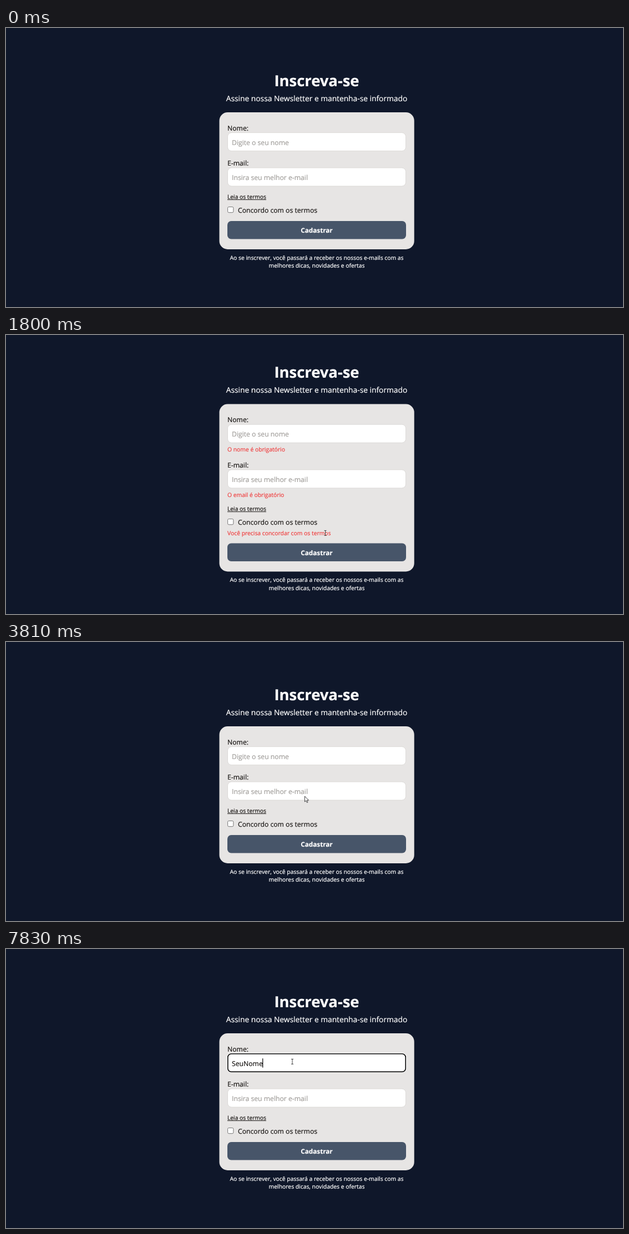
An HTML page with a canvas that plays this animation: 1112 px wide and 503 px high, repeating every 8000 ms.

```html
<!DOCTYPE html>
<html lang="pt-BR">
<head>
<meta charset="utf-8">
<title>Inscreva-se</title>
<style>
  html, body { margin: 0; width: 100%; height: 100%; overflow: hidden; background: #0f172a; }
  canvas { display: block; }
</style>
</head>
<body>
<canvas id="stage" width="1112" height="503"></canvas>
<script>
const ctx = document.getElementById('stage').getContext('2d');
const LOOP = 8000, MID = 560, LEFT = 399, WIDTH = 322, RADIUS = 7;
const ENTER = 320, ERROR_ON = 1750, RELOAD = 3240, FOCUS = 4340;
const INK = '#1c1917', RED = '#ef4444', HINT = '#a3a09d';
const BODY = 12.2, SMALL = 10.36, ERROR_ROW = 18.3;
const FIELD_H = 34, NAME_Y = 188.2, MAIL_Y = 251.6, BUTTON_Y = 348, BUTTON_H = 32.6;

const NAME = 'SeuNome';
const PRESSES = [5340, 6000, 6190, 6970, 7550, 7730, 7830];
const BLINK = 545, CLICK = 180;
const ARROW = new Path2D('M0 0V10L2.3 7.9 4 11.5 5.6 10.8 4 7.4 7.1 7.2Z');

const mix = (a, b, p) => a + (b - a) * p;
const progress = (t, from, to) => Math.min(1, Math.max(0, (t - from) / (to - from)));
const within = (v, start, size) => v >= start && v < start + size;
const hasErrors = t => t >= ERROR_ON && t < RELOAD;

function pointerAt(t) {
  if (t < RELOAD) {
    const glide = 1 - (1 - progress(t, ENTER, 960)) ** 2;
    return { x: mix(845, 575.5, glide), y: mix(479, 357, glide) };
  }
  const p = progress(t, RELOAD, 4160);
  return { x: mix(575, 516, p), y: mix(357, 203, p ** 1.4) };
}

// The pointer shape follows what lies under it with a short delay
function overText(t) {
  const past = t - 50, { y } = pointerAt(past);
  return hasErrors(past) || within(y, NAME_Y, FIELD_H) || within(y, MAIL_Y, FIELD_H);
}

function text(str, x, y, size, color, weight = 400, align = 'left') {
  ctx.font = `${weight} ${size}px "Open Sans", "Noto Sans", sans-serif`;
  ctx.textAlign = align;
  ctx.fillStyle = ctx.strokeStyle = color;
  ctx.lineWidth = 0.22;
  ctx.fillText(str, x, y);
  ctx.strokeText(str, x, y);
  return ctx.measureText(str).width;
}

const centered = (str, y, size, weight) => text(str, MID, y, size, '#fff', weight, 'center');

function box(x, y, w, h, r, fill, stroke, line = 1) {
  ctx.beginPath();
  ctx.roundRect(x, y, w, h, r);
  if (fill) {
    ctx.fillStyle = fill;
    ctx.fill();
  }
  if (stroke) {
    ctx.strokeStyle = stroke;
    ctx.lineWidth = line;
    ctx.stroke();
  }
}

// Dark focus ring with a thin white edge; grow moves it outwards
function ring(y, h, grow) {
  const line = (g, color, width) =>
    box(LEFT - g, y - g, WIDTH + 2 * g, h + 2 * g, RADIUS + g, null, color, width);
  line(grow + 0.5, '#fff', 1);
  line(grow - 0.8, '#101010', 1.7);
}

function field(y, label, hint, error, focused, value) {
  text(label, LEFT, y - 3.4, BODY, INK);
  box(LEFT + 0.5, y + 0.5, WIDTH - 1, FIELD_H - 1, RADIUS, '#fff', '#d6d3d1', 0.8);
  if (focused) ring(y, FIELD_H, 0);
  if (error) text(error, LEFT, y + 49.5, SMALL, RED);
  return text(value || hint, 407, y + 22.4, BODY, value ? INK : HINT);
}

function drawForm(t) {
  const failed = hasErrors(t), focused = t >= FOCUS;
  const done = PRESSES.filter(time => t >= time);
  const typed = NAME.slice(0, done.length);

  // Each error adds a row, and the form stays vertically centered
  const row = failed ? ERROR_ROW : 0;
  const top = -1.5 * row, second = top + row, third = second + row, last = third + row;

  centered('Inscreva-se', 104.6 + top, 27.4, 700);
  centered('Assine nossa Newsletter e mantenha-se informado', 131.8 + top, 13.78);
  box(384.5, 152 + top, 351.2, 247 + 3 * row, 15, '#e7e5e4');

  const width = field(NAME_Y + top, 'Nome:', 'Digite o seu nome',
    failed && 'O nome é obrigatório', focused, typed);
  const idle = t - (done.pop() || FOCUS);
  if (focused && idle % (2 * BLINK) < BLINK) {
    ctx.fillStyle = '#000';
    ctx.fillRect(407 + (typed ? width - 0.6 : 0), 197.3, 1.2, 16.5);
  }
  field(MAIL_Y + second, 'E-mail:', 'Insira seu melhor e-mail', failed && 'O email é obrigatório');

  const link = text('Leia os termos', LEFT, 307.8 + third, 10.26, INK);
  ctx.fillRect(LEFT, 309 + third, link, 1);
  box(399.6, 322.5 + third, 10.2, 10.2, 2, '#fff', '#767676');
  text('Concordo com os termos', 418, 332.8 + third, BODY, INK);
  if (failed) text('Você precisa concordar com os termos', LEFT, 352 + third, SMALL, RED);

  const hover = t >= ENTER && !(t >= 1800 && t < RELOAD) && within(pointerAt(t).y, BUTTON_Y, BUTTON_H);
  box(LEFT, BUTTON_Y + last, WIDTH, BUTTON_H, RADIUS, hover ? '#64748b' : '#475569');
  if (failed && t >= 3090) ring(BUTTON_Y + last, BUTTON_H, 1);
  centered('Cadastrar', 369.2 + last, 11.7, 700);

  centered('Ao se inscrever, você passará a receber os nossos e-mails com as', 417.7 + last, SMALL);
  centered('melhores dicas, novidades e ofertas', 432.3 + last, SMALL);
}

function drawPointer(t) {
  const { x, y } = pointerAt(t);
  if ([1570, FOCUS].some(start => within(t, start, CLICK))) {
    box(x - 9, y - 9, 18, 18, 9, 'rgba(255, 255, 0, 0.47)');
  }
  if (overText(t)) {
    ctx.fillStyle = '#444';
    ctx.fillRect(x - 0.5, y - 5, 1, 10);
    ctx.fillRect(x - 2, y - 5, 4, 1);
    ctx.fillRect(x - 2, y + 4, 4, 1);
    return;
  }
  ctx.save();
  ctx.translate(x, y);
  ctx.fillStyle = '#fff';
  ctx.strokeStyle = '#111';
  ctx.lineWidth = 0.8;
  ctx.fill(ARROW);
  ctx.stroke(ARROW);
  ctx.restore();
}

function draw() {
  const t = performance.now() % LOOP;
  ctx.textRendering = 'geometricPrecision';
  ctx.fillStyle = '#0f172a';
  ctx.fillRect(0, 0, 1112, 503);
  drawForm(t);
  if (t >= ENTER) drawPointer(t);
  requestAnimationFrame(draw);
}

draw();
</script>
</body>
</html>
```
